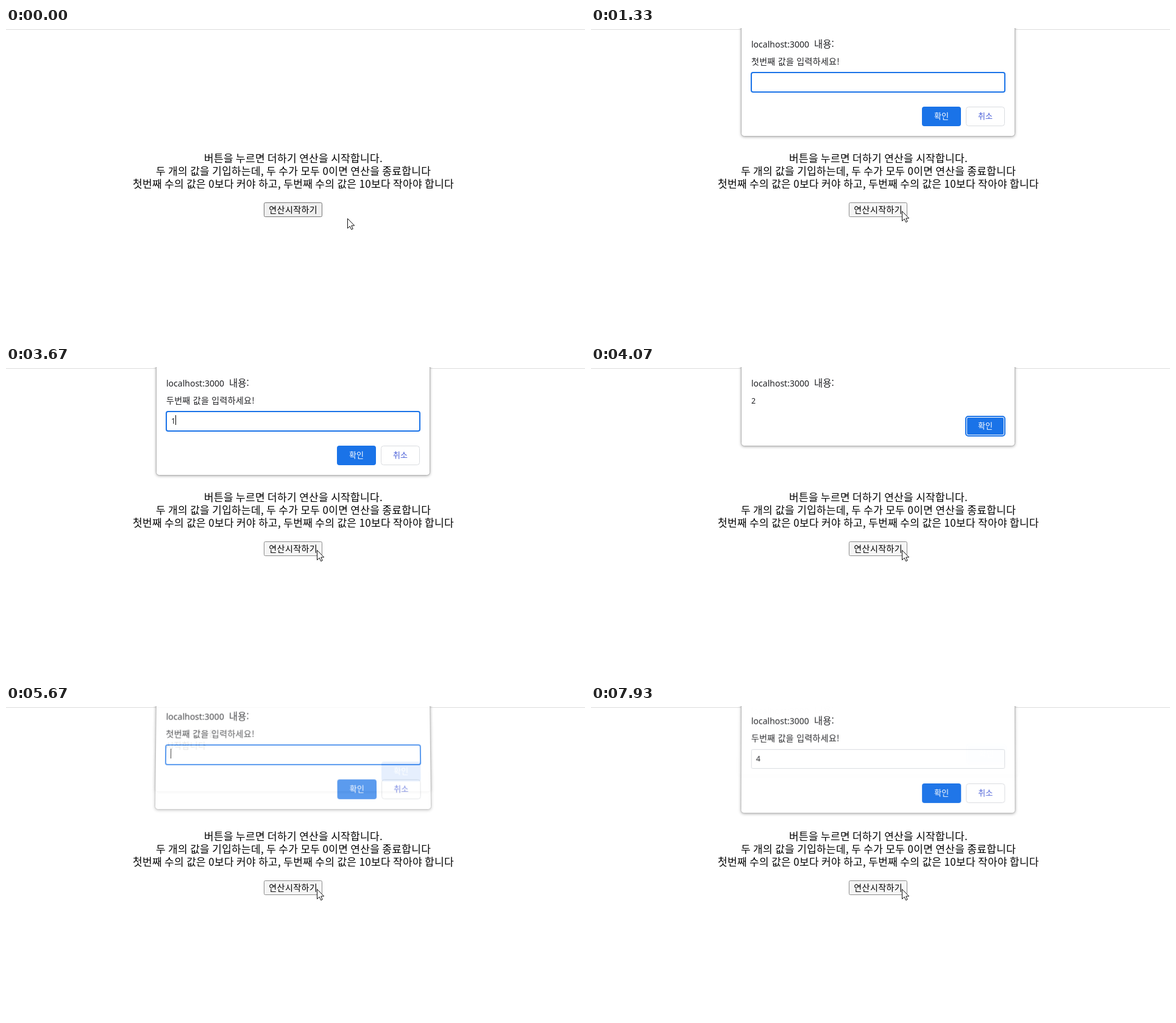
Animation, 950 px wide and 510 px high, one loop 8000 ms. Source, as an HTML page:

```html
<!DOCTYPE html>
<html lang="ko">
<head>
<meta charset="utf-8">
<title>더하기 연산</title>
<style>
  html, body { margin: 0; width: 100%; height: 100%; overflow: hidden; background: #fff; }
  svg { position: absolute; left: 0; top: 0; width: 950px; height: 510px; overflow: visible; }
  text { font: 350 14px "Noto Sans CJK KR", "Noto Sans CJK", sans-serif; letter-spacing: .3px; fill: #202124; }
  .page { font-size: 17px; word-spacing: -.85px; fill: #000; text-anchor: middle; }
  .start { letter-spacing: .4px; fill: #000; text-anchor: middle; }
  .host, .num { font-family: "Noto Sans", sans-serif; font-weight: 400; letter-spacing: 0; }
  .num { font-size: 12.5px; }
  .ko { font-size: 15.5px; letter-spacing: 0; }
  .label { font-size: 13px; letter-spacing: 0; text-anchor: middle; }
  .ok { fill: #fff; font-weight: 500; }
  .cancel { fill: #4a5fd8; }
  .dialog { transform-origin: 471px 0; filter: drop-shadow(0 1px 2px rgba(0, 0, 0, .3)); }
  .panel { fill: #fff; stroke: #b4b4b4; }
  .blue { fill: #1a73e8; }
  .ring { fill: #fff; stroke: #1a73e8; stroke-width: 2; }
  .thin { fill: #fff; stroke: #dadce0; }
</style>
</head>
<body>
<svg>
  <path d="M0 2.5H950" stroke="#dcdcdc"/>
  <text class="page" x="471.5" y="220">버튼을 누르면 더하기 연산을 시작합니다.</text>
  <text class="page" x="471.5" y="241">두 개의 값을 기입하는데, 두 수가 모두 0이면 연산을 종료합니다</text>
  <text class="page" x="471.5" y="262">첫번째 수의 값은 0보다 커야 하고, 두번째 수의 값은 10보다 작아야 합니다</text>
  <rect id="start" x="423.5" y="286.5" width="95" height="23" rx="2"/>
  <text class="start" x="471.2" y="303">연산시작하기</text>
</svg>
<div id="dialogs"></div>
<svg>
  <path id="cursor" d="M.5 .5V16.5L4.2 13L6.7 18.5L9.2 17.4L6.8 12H11.7Z" fill="#fff" stroke="#111"/>
</svg>
<script>
const FPS = 15, LOOP = 8000, BLINK = 8;
const FIRST = '첫번째 값을 입력하세요!', SECOND = '두번째 값을 입력하세요!';

// Times are in ticks of 1/15 s; dialogs with a typed value are prompts.
const dialogs = [
  { open: 12, close: 49, lines: [FIRST], value: '1', typed: 45 },
  { open: 49, close: 57, lines: [SECOND], value: '1', typed: 55 },
  { open: 57, close: 73, lines: ['2'] },
  { open: 73, close: 83, lines: ['더하기 연산을', '시작합니다'] },
  { open: 83, close: 107, lines: [FIRST], value: '3', typed: 105 },
  { open: 107, close: 118, lines: [SECOND], value: '4', typed: 116 },
  { open: 118, close: 999, lines: ['7'] }
];

// [tilt, opacity] for each tick after opening or closing
const OPENING = [[1, 0], [1, .015], [.5, .72], [.12, .95], [0, 1]];
const CLOSING = [[0, 1], [.12, .98], [.55, .4], [.9, .08], [1, 0]];
const PATH = [[1, 560, 312], [3, 525, 312], [6, 525, 312], [10, 510, 300]];

const rect = (cls, x, y, w, h, r = 4) =>
  `<rect class="${cls}" x="${x}" y="${y}" width="${w}" height="${h}" rx="${r}"/>`;
const text = (cls, x, y, s) => `<text class="${cls}" x="${x}" y="${y}">${s}</text>`;

function frame(bottom, lines) {
  return rect('panel', 246.5, -30, 449, bottom + 30, 5) +
    text('host', 263, 32, 'localhost:3000') + text('ko', 366, 32, '내용:') +
    lines.map((s, i) => text(s.length > 1 ? '' : 'num', 263, 60 + 20 * i, s)).join('');
}

function promptBody(d, n, focused) {
  const typed = n >= d.typed;
  const caretOn = focused && (typed || Math.floor((n - d.open) / BLINK) % 2 === 0);
  return frame(177.5, d.lines) +
    (focused ? rect('ring', 263, 73, 416, 32, 3) : rect('thin', 263.5, 73.5, 415, 31, 2)) +
    (typed ? text('num', 271, 93, d.value) : '') +
    (caretOn ? rect('', typed ? 278 : 271, 79, 1, 16, 0) : '') +
    rect('blue', 543, 129, 64, 32) + text('label ok', 575, 149, '확인') +
    rect('thin', 615.5, 129.5, 63, 31) + text('label cancel', 647, 149, '취소');
}

function alertBody(d, focused) {
  const drop = 20 * (d.lines.length - 1);
  return frame(129.5 + drop, d.lines) +
    (focused
      ? rect('ring', 615, 81 + drop, 64, 32) + rect('blue', 617, 83 + drop, 60, 28, 2)
      : rect('blue', 615, 81 + drop, 64, 32)) +
    text('label ok', 647, 101 + drop, '확인');
}

function drawDialog(d, n) {
  const closing = n >= d.close;
  const phases = closing ? CLOSING : OPENING;
  const step = Math.min(4, Math.max(0, n - (closing ? d.close : d.open)));
  const [tilt, opacity] = phases[step];
  d.el.style.display = opacity ? '' : 'none';
  if (!opacity) return;
  d.el.style.opacity = opacity;
  d.el.style.transform = tilt
    ? `perspective(1000px) translateY(${-18.5 * tilt}px) rotateX(${6 * tilt}deg)` : 'none';
  d.el.innerHTML = d.value ? promptBody(d, n, !closing) : alertBody(d, !closing);
}

function cursorAt(n) {
  const i = PATH.findIndex(p => n <= p[0]);
  if (i < 1) return PATH[i ? PATH.length - 1 : 0].slice(1);
  const [a, b] = [PATH[i - 1], PATH[i]];
  const f = (n - a[0]) / (b[0] - a[0]);
  return [1, 2].map(k => Math.round(a[k] + (b[k] - a[k]) * f));
}

const byId = id => document.getElementById(id);
for (const d of dialogs) {
  d.el = document.createElementNS('http://www.w3.org/2000/svg', 'svg');
  d.el.setAttribute('class', 'dialog');
  byId('dialogs').append(d.el);
}

let last = -1;
function draw() {
  const n = Math.floor(performance.now() % LOOP * FPS / 1000 + .08);
  if (n !== last) {
    last = n;
    const [fill, stroke] = n < 8 ? ['#efefef', '#767676']
      : n < 12 ? ['#e5e5e5', '#4f4f4f'] : ['#f5f5f5', '#8d8d8d'];
    byId('start').setAttribute('fill', fill);
    byId('start').setAttribute('stroke', stroke);
    byId('cursor').setAttribute('transform', `translate(${cursorAt(n)})`);
    dialogs.forEach(d => drawDialog(d, n));
  }
  requestAnimationFrame(draw);
}
draw();
</script>
</body>
</html>
```
